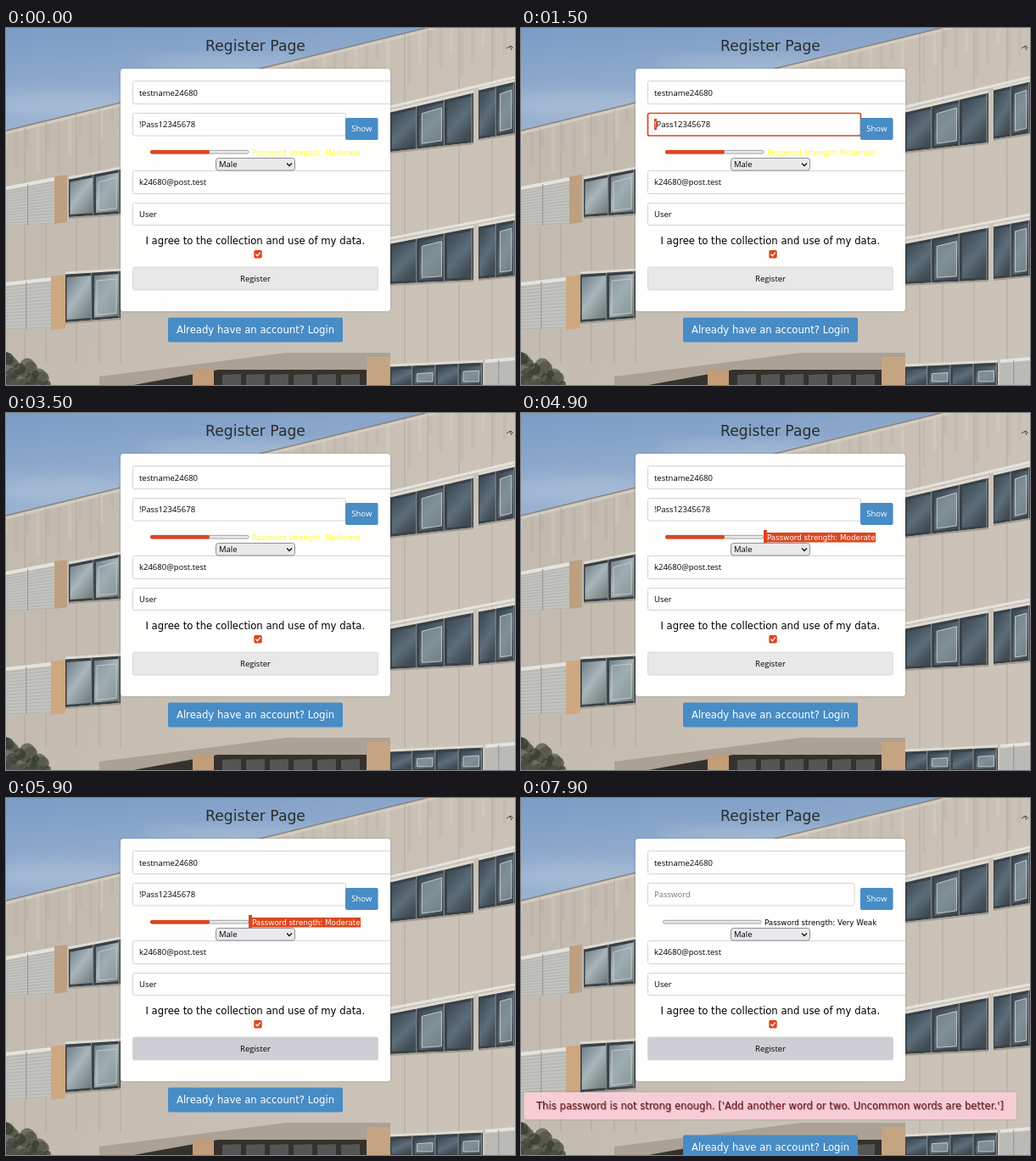
These frames come from a looping animation (600x421 px, 8 s). An HTML page:

```html
<!DOCTYPE html>
<html lang="en">
<head>
<meta charset="utf-8">
<title>Register Page</title>
<style>
html, body { margin: 0; width: 100%; height: 100%; overflow: hidden; }
svg { display: block; width: 100vw; height: 100vh; }
text { font: 11.65px "DejaVu Sans", Verdana, sans-serif; }
.ui { font: 500 9.5px "Open Sans", "Noto Sans", sans-serif; }
.small { font-size: 8.74px; }
.mid { text-anchor: middle; }
.white { fill: #fff; }
.field { fill: #fefefe; stroke: #d4d4d4; }
.blue { fill: #488cc5; }
.orange { fill: #dc461e; }
</style>
</head>
<body>
<svg viewBox="0 0 600 421" preserveAspectRatio="none">
  <defs>
    <linearGradient id="sky" x1="0" y1="0" x2=".15" y2="1">
      <stop offset="0" stop-color="#7b9cc6"/><stop offset=".28" stop-color="#9ab2d0"/><stop offset="1" stop-color="#b9c8da"/>
    </linearGradient>
    <linearGradient id="wall" x2="1" y2=".3">
      <stop offset="0" stop-color="#c1b9ae"/><stop offset="1" stop-color="#cbc3b8"/>
    </linearGradient>
    <linearGradient id="dark" x2=".6" y2="1">
      <stop offset="0" stop-color="#38444e"/><stop offset=".6" stop-color="#5c6d7a"/><stop offset="1" stop-color="#414b52"/>
    </linearGradient>
    <linearGradient id="pale" x2=".8" y2="1">
      <stop offset="0" stop-color="#6f7d86"/><stop offset=".5" stop-color="#a9b5ba"/><stop offset="1" stop-color="#75807f"/>
    </linearGradient>
    <filter id="soft"><feGaussianBlur stdDeviation="9"/></filter>
    <filter id="shade" x="-10%" y="-10%" width="120%" height="120%"><feDropShadow dx="0" dy="0" stdDeviation="1.5" flood-opacity=".18"/></filter>
    <clipPath id="cardClip"><rect x="135" y="48" width="318" height="286" rx="4"/></clipPath>
    <clipPath id="passClip"><rect id="passRange" y="107" height="13"/></clipPath>
    <clipPath id="labelClip"><rect id="labelRange" y="141" height="11.5"/></clipPath>
  </defs>

  <rect width="600" height="421" fill="url(#sky)"/>
  <g fill="#c3d0e0" opacity=".4" filter="url(#soft)">
    <ellipse cx="70" cy="90" rx="90" ry="13"/><ellipse cx="270" cy="45" rx="110" ry="10"/>
  </g>
  <g id="building"></g>

  <text x="294" y="27" class="mid" style="font-size:17.2px" fill="#2a2d2e">Register Page</text>
  <rect x="135" y="48" width="318" height="286" rx="4" fill="#fefefd" filter="url(#shade)"/>
  <g clip-path="url(#cardClip)">
    <g class="field">
      <rect x="149.5" y="62.5" width="320" height="27" rx="2"/>
      <rect x="149.5" y="168.5" width="320" height="27" rx="2"/>
      <rect x="149.5" y="206.5" width="320" height="26" rx="2"/>
    </g>
    <text x="157" y="80" class="ui">testname24680</text>
    <text x="157" y="185" class="ui">k24680@post.test</text>
    <text x="157" y="223" class="ui">User</text>
  </g>

  <rect id="passBox" class="field" x="149.5" y="100.5" height="26.5" rx="2"/>
  <text id="passText" x="157" y="117" class="ui"></text>
  <g id="passSelection">
    <rect id="passMark" class="orange" y="107" height="13"/>
    <text x="157" y="117" class="ui white" clip-path="url(#passClip)">!Pass12345678</text>
  </g>
  <rect id="show" class="blue" x="400" y="106" width="38.6" height="26" rx="2"/>
  <text x="419.3" y="122" class="ui mid white">Show</text>

  <g id="meter">
    <rect x="170.5" y="144.3" width="115.5" height="3.8" rx="1.9" fill="#e8e8ea" stroke="#8e8e94" stroke-width=".8"/>
    <rect id="meterFill" class="orange" x="170" y="143.9" width="70" height="4.6" rx="2"/>
  </g>
  <text id="label" y="150" class="small"></text>
  <g id="labelSelection">
    <rect id="labelMark" class="orange" y="141" height="11.5"/>
    <rect id="gapMark" class="orange" x="286" y="138" width="4" height="15"/>
    <text x="290" y="150" class="small white" clip-path="url(#labelClip)">Password strength: Moderate</text>
  </g>

  <rect x="247.5" y="153.5" width="93" height="14.5" rx="3" fill="#e9e9eb" stroke="#8f8f96"/>
  <text x="251" y="164" class="ui">Male</text>
  <path d="M331 159.5l3 3 3-3" fill="none" stroke="#111" stroke-width="1.3"/>

  <text x="293.8" y="255" class="mid">I agree to the collection and use of my data.</text>
  <rect class="orange" x="292.3" y="262" width="9.4" height="9.4" rx="1.6"/>
  <path d="M294.4 266.8l2 2 3.4-4.2" fill="none" stroke="#fff" stroke-width="1.3"/>
  <rect id="register" x="149.5" y="282" width="289" height="27" rx="2" stroke="#cfcfd2" stroke-width=".7"/>
  <text x="294" y="299" class="ui mid">Register</text>

  <g id="alert">
    <rect x="3.5" y="347" width="580.5" height="32" rx="3" fill="#f6cdd4" filter="url(#shade)"/>
    <text x="18.8" y="367.8" fill="#4a3034" opacity=".5">This password is not strong enough. ['Add another word or two. Uncommon words are better.']</text>
    <text x="18" y="367" fill="#721c24">This password is not strong enough. ['Add another word or two. Uncommon words are better.']</text>
  </g>
  <g id="login">
    <rect class="blue" x="191" y="341.5" width="206" height="29" rx="2"/>
    <text x="294" y="360.3" class="mid white">Already have an account? Login</text>
  </g>
</svg>

<script>
const el = id => document.getElementById(id);
const LOOP = 8000;
const mix = (a, b, k) => a + (b - a) * k;
const ramp = (t, from, to) => Math.min(1, Math.max(0, (t - from) / (to - from)));

// Upright-sided quad: left and right x, then top and bottom y on each side.
const quad = (x1, x2, t1, t2, b1, b2, fill) =>
  `<path d="M${x1} ${t1}L${x2} ${t2}V${b2}L${x1} ${b1}Z" fill="${fill}"/>`;
const line = (x1, y1, x2, y2, color, width = 1) =>
  `<path d="M${x1} ${y1}L${x2} ${y2}" stroke="${color}" stroke-width="${width}"/>`;

// A strip of panes; every second one holds an inner sash.
function glazing(x1, x2, t1, t2, b1, b2, panes, glass = 'dark') {
  let out = quad(x1, x2, t1, t2, b1, b2, '#3a4146');
  const top = k => mix(t1, t2, k), bottom = k => mix(b1, b2, k);
  for (let i = 0; i < panes; i++) {
    const a = (i + .05) / panes, b = (i + .94) / panes;
    const xa = mix(x1, x2, a), xb = mix(x1, x2, b);
    out += quad(xa, xb, top(a) + 4, top(b) + 4, bottom(a) - 3, bottom(b) - 3, `url(#${glass})`);
    out += line(xb, top(b), xb, bottom(b), '#7d868a', 1.2);
    if (i % 2) {
      out += `<path d="M${xa + 3} ${top(a) + 10}L${xb - 3} ${top(b) + 10}V${bottom(b) - 6}L${xa + 3} ${bottom(a) - 6}Z"
        fill="#98a8ac" fill-opacity=".6" stroke="#c3c9c9"/>`;
    }
  }
  return out + line(x1, t1 - 1, x2, t2 - 1, '#dedbd5', 3) + line(x1, b1 + 1, x2, b2 + 1, '#a29b91', 2);
}

function blinds(x1, x2, t1, t2, b1, b2) {
  let out = quad(x1, x2, t1, t2, b1, b2, '#c3c3be');
  for (let k = 0; k < 1; k += .07)
    out += line(x1, mix(t1, b1, k), x2, mix(t2, b2, k), '#acada9', .8);
  return out + line(x1, t1, x2, t2, '#e6e3df', 4) +
    line(mix(x1, x2, .45), mix(t1, t2, .45), mix(x1, x2, .45), mix(b1, b2, .45), '#93948f');
}

function building() {
  let out = '<path d="M0 121L135 88L495 0H600V421H0Z" fill="url(#wall)"/>';
  out += line(0, 121, 495, 0, '#8a847c', 1.5) + line(0, 124, 507, 0, '#d3ccc2', 3);
  for (const x of [22, 47, 83, 110, 135, 470, 497, 534, 573]) {
    const roof = Math.max(0, 123 - x * .247);
    out += line(x, roof, x, 395, '#b0a89d', .9);
  }
  for (let i = 0; i < 45; i++) {
    const x = (i * 137.5) % 600, roof = Math.max(0, 126 - x * .247);
    out += line(x, roof, x, roof + 15 + (i * 29) % 45, i % 3 ? '#8d857b18' : '#eee5da28', 4);
  }

  out += quad(57, 72, 175, 173, 231, 229, '#bd9f81') + quad(53, 70, 293, 291, 356, 354, '#cda880');
  out += blinds(0, 57, 189, 178, 234, 231) + glazing(74, 135, 178, 166, 223, 219, 2, 'pale');
  out += blinds(0, 53, 302, 296, 356, 354) + glazing(70, 135, 290, 286, 347, 342, 2, 'pale');

  out += glazing(453, 551, 99, 76, 146, 135, 3) + glazing(557, 600, 73, 63, 131, 124, 2);
  out += line(453, 93, 600, 58, '#e6e3dc', 3);
  out += glazing(453, 551, 254, 235, 302, 297, 3) + glazing(557, 600, 234, 226, 296, 292, 2);
  out += line(453, 248, 600, 220, '#e6e3dc', 3);

  out += '<path d="M110 411L330 383H453V404H250L150 421H110Z" fill="#aba194"/>';
  out += '<path d="M150 421L250 403H453V421Z" fill="#35312d"/>';
  for (let x = 255; x < 420; x += 28) out += quad(x, x + 22, 409, 408, 421, 421, '#555654');
  out += quad(220, 245, 403, 403, 421, 421, '#c39c78') + quad(425, 453, 388, 388, 421, 421, '#c5a482');
  out += glazing(453, 562, 399, 394, 423, 423, 4) + blinds(565, 600, 393, 390, 421, 421);

  for (let i = 0; i < 34; i++) {
    const x = (i * 23.7) % 52, y = 386 + x * .45 + (i * 11) % 36;
    out += `<circle cx="${x}" cy="${y}" r="${4 + (i * 7) % 6}" fill="${['#35392f', '#454840', '#565749'][i % 3]}" opacity=".75"/>`;
  }
  return out + '<path d="M590 24l5-3 3 3M594 21l2 5" stroke="#4b463f" fill="none"/>';
}
el('building').innerHTML = building();

const set = (id, attrs) => { for (const key in attrs) el(id).setAttribute(key, attrs[key]); };
const visible = (id, on) => set(id, { visibility: on ? 'visible' : 'hidden' });
const blend = (from, to, k) => `rgb(${from.map((c, i) => mix(c, to[i], k))})`;

function select(name, from, to) {
  visible(name + 'Selection', to > from);
  for (const part of ['Mark', 'Range']) set(name + part, { x: from, width: Math.max(0, to - from) });
}

function draw(t) {
  const rejected = t >= 7400;
  const focus = ramp(t, 400, 700) * (1 - ramp(t, 2700, 2900));
  set('passBox', {
    width: rejected ? 243.5 : 251,
    style: focus ? `stroke:${blend([212, 212, 212], [220, 70, 30], focus)};stroke-width:${1 + focus * .7}` : ''
  });
  el('passText').textContent = rejected ? 'Password' : '!Pass12345678';
  set('passText', { fill: rejected ? '#777' : '#000' });

  // Selection grows over the symbol, the letters, then the digits.
  const passEnd = t < 1500 || t >= 2500 ? 157 : t < 1800 ? 160 : t < 1900 ? 173 : t < 2300 ? 180 : 223.5;
  select('pass', 157, passEnd);

  const hover = ramp(t, 2400, 2600) * (1 - ramp(t, 3400, 3500));
  set('show', { style: `fill:${blend([72, 140, 197], [52, 115, 170], hover)}` });

  set('meter', { transform: `translate(${rejected ? -3 : 0})` });
  visible('meterFill', !rejected);
  el('label').textContent = 'Password strength: ' + (rejected ? 'Very Weak' : 'Moderate');
  set('label', { x: rejected ? 287 : 290, fill: rejected ? '#000' : '#ffff20' });
  select('label', t < 4100 ? 376 : 286, t < 3900 || rejected ? 0 : 418);
  set('gapMark', { width: t >= 4100 ? 4 : 0 });

  set('register', { fill: blend([232, 232, 232], [206, 206, 212], ramp(t, 5100, 5500)) });

  visible('alert', rejected);
  set('alert', { opacity: ramp(t, 7300, 7900) });
  set('login', { transform: `translate(0 ${rejected ? 56 : 0})` });
}

function frame() {
  draw(Math.floor(performance.now() % LOOP / 100) * 100);
  requestAnimationFrame(frame);
}
frame();
</script>
</body>
</html>
```
